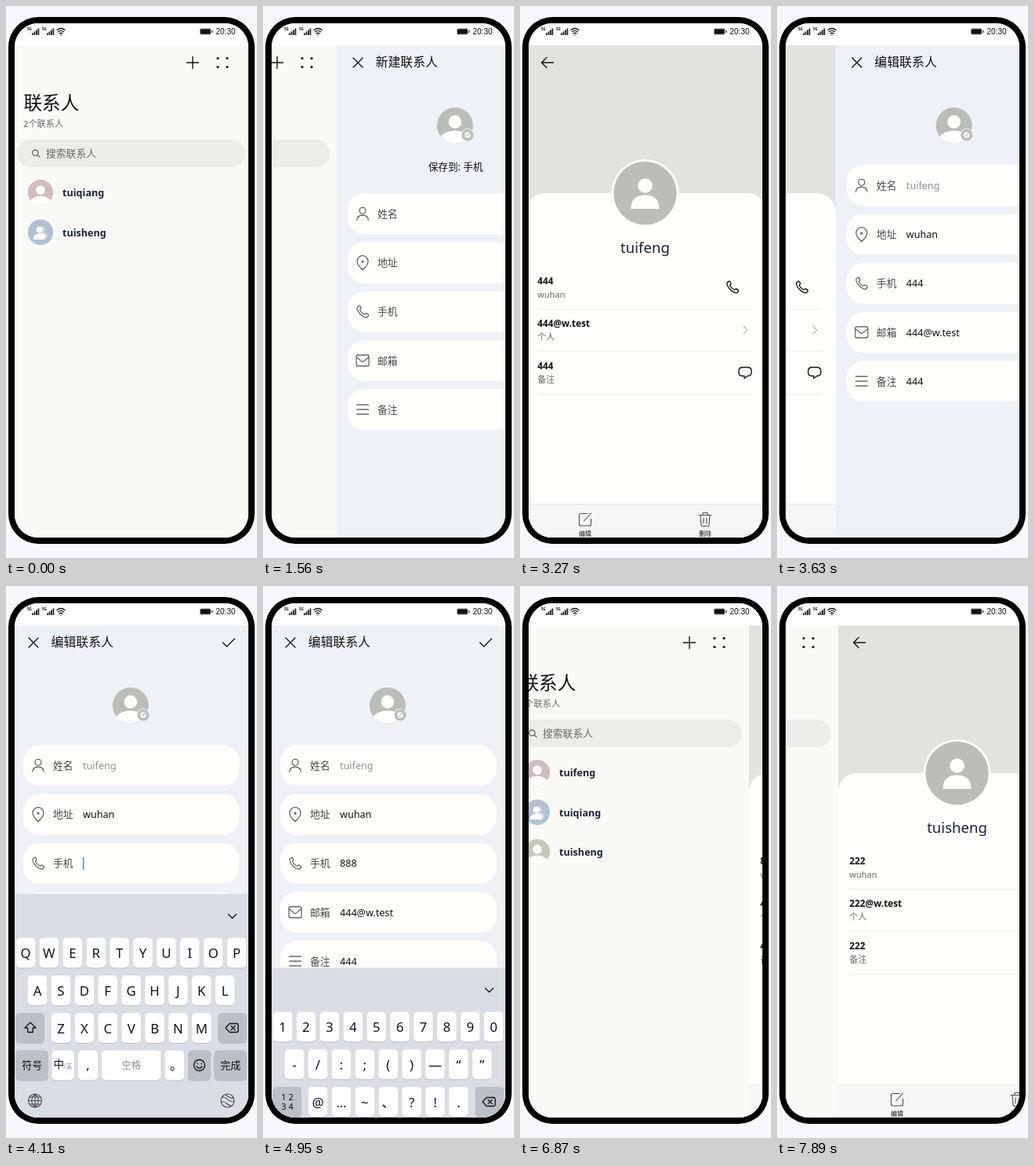
An HTML page that plays this animation: 320x702 px, repeating every 8 s.

```html
<!DOCTYPE html>
<html lang="zh-CN">
<head>
<meta charset="utf-8">
<title>联系人</title>
<style>
html, body { margin: 0; width: 100%; height: 100%; overflow: hidden; background: #f8f8fc; }
svg { display: block; width: 100%; height: 100%; }
text { font-family: "Noto Sans", "Noto Sans CJK SC", "Noto Sans CJK", sans-serif; fill: #121212; white-space: pre; }
.line { fill: none; stroke: #4c4c4c; stroke-width: 1.1; stroke-linecap: round; stroke-linejoin: round; }
.dark { stroke: #161616; stroke-width: 1.4; }
.faint { stroke: #b8b8b4; }
.mid { text-anchor: middle; }
.med { font-weight: 500; }
.bold { font-weight: 700; }
.ink { fill: #1c2038; }
.label { fill: #474747; }
.soft { fill: #696969; }
.pale { fill: #909298; }
</style>
</head>
<body>
<svg viewBox="0 0 320 702">
  <defs>
    <clipPath id="screen"><rect x="11" y="22" width="298" height="654" rx="30"/></clipPath>
  </defs>
  <rect x="3" y="14" width="314" height="670" rx="38"/>
  <g id="stage" clip-path="url(#screen)"></g>
</svg>
<script>
const LOOP = 8000, BEAT = 120, WIDTH = 306, KEYBOARD = 285;
const CUES = [0, 1200, 2130, 2460, 3270, 5850, 6510, 7650];
const SHEET = '#fefefb', GREY = '#bcbdb9', INK = '#121212';

const text = (x, y, size, s, cls = '') =>
  `<text x="${x}" y="${y + size * 0.37}" font-size="${size}" class="${cls}">${s}</text>`;
const rect = (x, y, w, h, fill, r = 0) =>
  `<rect x="${x}" y="${y}" width="${w}" height="${h}" rx="${r}" fill="${fill}"/>`;
const dot = (x, y, r, fill) => `<circle cx="${x}" cy="${y}" r="${r}" fill="${fill}"/>`;
const icon = (x, y, d, cls = '') =>
  `<path class="line ${cls}" transform="translate(${x} ${y})" d="${d}"/>`;
const page = (id, body) => `<g id="${id}" class="page">${body}</g>`;
const ring = r => `M${-r} 0a${r} ${r} 0 1 0 ${2 * r} 0a${r} ${r} 0 1 0 ${-2 * r} 0`;
const loop = (x, y, r) => `M${x - r} ${y}a${r} ${r} 0 1 0 ${2 * r} 0a${r} ${r} 0 1 0 ${-2 * r} 0`;

const ICON = {
  person: loop(0, -4, 4) + 'M-7.3 8Q-7 1.8 0 1.8T7.3 8',
  pin: 'M0 9Q-7 3-7-2A7 7 0 0 1 7-2Q7 3 0 9Z' + loop(0, -1.5, 1),
  phone: 'M-4.2-7.6L-7-5.6C-7.6 0 0 7.6 5.6 7.4L7.5 5Q7.8 3.6 4.6 2L2.4 3.4Q-2.3 1-3.4-2.4L-2-4.6Q-3.2-7.6-4.2-7.6Z',
  mail: 'M-6-7H6Q8-7 8-5V5Q8 7 6 7H-6Q-8 7-8 5V-5Q-8-7-6-7ZM-7.5-4L-1 1.2Q0 2 1 1.2L7.5-4',
  lines: 'M-7.5-6H7.5M-7.5 0H7.5M-7.5 6H7.5',
  close: 'M-6-6L6 6M6-6L-6 6',
  check: 'M-7.5 0L-2.5 5L7.5-5',
  back: 'M7.5 0H-7.5M-1-6.5L-7.5 0L-1 6.5',
  plus: 'M-7.5 0H7.5M0-7.5V7.5',
  next: 'M-2.5-5L2.5 0L-2.5 5',
  down: 'M-5-2.5L0 2.5L5-2.5',
  search: loop(-0.6, -0.7, 3.7) + 'M2.2 2L5 4.7',
  chat: 'M-4-6.5H4A4.5 4.5 0 0 1 8-2V0A4.5 4.5 0 0 1 4 4.5H3L-1 7.5V4.5H-4A4.5 4.5 0 0 1-8 0V-2A4.5 4.5 0 0 1-4-6.5Z',
  edit: 'M3-7.5H-5.5Q-7.5-7.5-7.5-5.5V6Q-7.5 8-5.5 8H5.5Q7.5 8 7.5 6V-1M7.5-8L-1.5 2',
  trash: 'M-8-5.5H8M-3-5.5V-8.5H3V-5.5M-6-5.5L-5 7Q-4.8 8.5-3.5 8.5H3.5Q4.8 8.5 5 7L6-5.5M-2-2V5M2-2V5',
  shift: 'M0-7L7 0H3.3V5.5H-3.3V0H-7Z',
  erase: 'M-3-5.5H6Q8-5.5 8-3.5V3.5Q8 5.5 6 5.5H-3L-8 0ZM-1-2.5L4 2.5M4-2.5L-1 2.5',
  smile: ring(7) + 'M-3.5 1.5Q0 6 3.5 1.5M-2.5-2.2V-1.8M2.5-2.2V-1.8',
  lock: 'M-5-1H5V7H-5ZM-3-1V-4A3 3 0 0 1 3-4V-1M0 2V4',
  globe: ring(8.5) + 'M-8.5 0H8.5M0-8.5V8.5M0-8.5Q-8.5 0 0 8.5Q8.5 0 0-8.5M-7-4.5H7M-7 4.5H7',
  swirl: ring(8.5) + 'M-7.5-4C-2-7 0 3 8 1M-8 2C-2-1 0 8 5.5 6.5M-3-8Q2-3 8-3',
  grid: 'M-4.5-4.5H-1V-1H-4.5ZM-4.5 4.5L-2.7 1.5L-1 4.5ZM3.2 1.2L5 3L3.2 4.8L1.5 3Z' + loop(3.2, -2.8, 1.8),
  maths: 'M-5-3H-1M-3-5V-1M2-3H6M-5 2L-1.5 5.5M-1.5 2L-5 5.5M2 3.5H6M4 1.5V1.6M4 5.5V5.6',
  faces: loop(-3, -3, 2.4) + loop(3, -3, 2.4) + loop(-3, 3, 2.4) + loop(3, 3, 2.4)
};

// Head and shoulders cut off by the lower edge of a disc.
const bust = (x, y, r, fill) => {
  const edge = r * 0.8, low = r * 0.6;
  return dot(x, y, r, fill) + dot(x, y - r * 0.2, r * 0.36, SHEET) +
    `<path fill="${SHEET}" d="M${x - edge} ${y + low}Q${x - edge * 0.6} ${y + r * 0.28} ${x} ${y + r * 0.28}T${x + edge} ${y + low}A${r} ${r} 0 0 1 ${x - edge} ${y + low}Z"/>`;
};
const figure = (x, y, k, fill) =>
  `<g transform="translate(${x} ${y}) scale(${k})" fill="${fill}"><circle cy="-9.5" r="9.3"/><path d="M-18 20Q-18 2.5 0 2.5T18 20Z"/></g>`;

function contactList(id, names) {
  const tints = ['#d0bdc0', '#b2c2d2', '#c4c9b8'];
  const rows = names.map((name, i) => {
    const y = 237.3 + i * 50.4;
    const avatar = i === 1
      ? dot(44, y, 16.2, tints[i]) + figure(46, y - 0.5, 0.36, '#dde5ec') + figure(42.5, y + 0.8, 0.42, SHEET)
      : bust(44, y, 16.2, tints[i]);
    return avatar + text(72, y + 0.5, 12.6, name, 'bold ink');
  }).join('');
  const menu = [270, 282].map(x => dot(x, 66.5, 1.6, INK) + dot(x, 77.5, 1.6, INK)).join('');
  return page(id, rect(8, 50, WIDTH, 630, '#f9faf6') + icon(238, 72, ICON.plus, 'dark') + menu +
    text(22.5, 123, 23.6, '联系人') + text(22, 149.5, 11.2, names.length + '个联系人', 'soft') +
    rect(14, 170, 291, 35, '#ececE8', 17.5) + icon(38, 187.5, ICON.search) +
    text(51, 187.5, 12.8, '搜索联系人', 'soft') + rows);
}

function contactForm(id, title, top, note) {
  const fields = [['姓名', 'person'], ['地址', 'pin'], ['手机', 'phone'], ['邮箱', 'mail'], ['备注', 'lines']];
  const rows = fields.map(([label, name], i) => {
    const y = top + i * 62.2;
    return rect(22, y, 275.5, 52, SHEET, 21) + icon(41, y + 26, ICON[name]) +
      text(60, y + 26, 12.8, label, 'label') + text(98, y + 26, 12.6, '', 'value');
  }).join('');
  return page(id, rect(8, 50, WIDTH, 630, '#eef1f5') + icon(35, 72, ICON.close, 'dark') +
    text(57.5, 71.5, 15.9, title, 'med') + icon(284, 72, ICON.check, 'dark') +
    bust(158.8, 152, 23, GREY) + dot(175, 164, 8.6, '#eef1f5') + dot(175, 164, 7.4, GREY) +
    rect(171.5, 160.5, 7, 7, SHEET, 1.5) + icon(175, 164, 'M-1.5 1.5L2.5-2.5', 'faint') +
    (note ? text(159.5, 204.5, 12.6, '保存到: 手机', 'mid') : '') + rows);
}

function contactCard(id, name, phone, code) {
  const entry = (y, head, sub) => text(22.3, y, 11.8, head, 'bold') + text(22.3, y + 17.3, 11, sub, 'soft med');
  const rules = [385, 438.5, 493.5].map(y => rect(22, y, 275, 1, '#eeeeeb')).join('');
  return page(id, rect(8, 50, WIDTH, 630, '#e2e3df') + icon(35, 72, ICON.back, 'dark') +
    `<path fill="${SHEET}" d="M8 680V262A24 24 0 0 1 32 238H290A24 24 0 0 1 314 262V680Z"/>` +
    dot(159.5, 238, 43, SHEET) + dot(159.5, 238, 40.2, GREY) + figure(159.5, 238, 1, SHEET) +
    text(159.5, 307, 18.6, name, 'mid ink') + rules +
    entry(349.5, phone, 'wuhan') + entry(403.5, code + '@w.test', '个人') + entry(457.5, code, '备注') +
    icon(271, 357.5, ICON.phone, 'dark') + icon(287.5, 412, ICON.next, 'faint') + icon(287, 466, ICON.chat, 'dark') +
    rect(8, 633, WIDTH, 50, '#f6f7f4') + rect(8, 633, WIDTH, 1, '#e8e8e5') +
    icon(83, 653, ICON.edit) + icon(236, 653, ICON.trash) +
    text(83, 671, 8, '编辑', 'mid') + text(236, 671, 8, '删除', 'mid'));
}

const key = (x, y, w, body, special) =>
  rect(x, y + 1, w, 38, '#b9bdc4', 5) + rect(x, y, w, 38, special ? '#bbbfc6' : '#fefefe', 5) + body;
const keyRow = (chars, x, y) => [...chars].map((c, i) => {
  const cx = x + i * 29.9;
  return key(cx - 12.3, y, 24.6, text(cx, y + 19.5, 16.8, c, 'mid'));
}).join('');
const wordKey = (x, w, s, size, cls, special) => key(x, 590.5, w, text(x + w / 2, 609.5, size, s, 'mid ' + cls), special);

const letterKeys = () => keyRow('QWERTYUIOP', 25, 447.5) + keyRow('ASDFGHJKL', 40, 495.3) + keyRow('ZXCVBNM', 70, 543) +
  key(12.5, 543, 36.5, icon(31, 562, ICON.shift, 'dark'), true) +
  wordKey(12.5, 41.5, '符号', 13, '', true) +
  key(58.5, 590.5, 28.5, text(60.5, 608.5, 13.5, '中') + text(73.5, 611, 8, '/英', 'pale')) +
  wordKey(92, 25, ',', 16, '') + wordKey(122, 75.5, '空格', 12.5, 'pale') +
  key(202.5, 590.5, 24.5, text(209, 609, 16, '。')) +
  key(232, 590.5, 29, icon(246.5, 609.5, ICON.smile, 'dark'), true) +
  wordKey(265.5, 41.5, '完成', 13, '', true);

const symbolKeys = () => keyRow('1234567890', 25, 447.5) + keyRow('-/:;()—“”', 40, 495.3) + keyRow('@…~、?!.', 70, 543) +
  key(12.5, 543, 36.5, text(31, 556, 11, '1 2', 'mid') + text(31, 568, 11, '3 4', 'mid'), true) +
  wordKey(12.5, 41.5, '返回', 13, '', true) +
  dot(75, 609.5, 10.3, '#c4c8cf') + text(75, 609.5, 8, '#+=', 'mid bold') +
  text(105.5, 609.5, 12, '中', 'mid pale') + text(136, 609.5, 12, '英', 'mid pale') +
  icon(166.5, 609, ICON.grid, 'faint') + icon(197, 609, ICON.maths, 'faint') + icon(228, 609, ICON.faces, 'faint') +
  icon(256, 609, 'M2-5H-2V5H2M-2 0H2', 'faint') +
  key(265.5, 590.5, 41.5, icon(286, 608.5, ICON.lock), true);

const keyboard = () => `<g id="keyboard">` + rect(8, 391.5, WIDTH, 290, '#dadde3') + icon(288.5, 420, ICON.down, 'dark') +
  `<g id="letters">${letterKeys()}</g><g id="symbols">${symbolKeys()}</g>` +
  key(270.5, 543, 36.5, icon(288, 562, ICON.erase, 'dark'), true) +
  icon(37, 654.5, ICON.globe) + icon(282.5, 654.5, ICON.swirl) + '</g>';

function statusBar() {
  const bars = x => [0, 1, 2, 3].map(i => rect(x + 6 + i * 2.5, 34.5 - i * 2, 1.8, 2.5 + i * 2, '#242424')).join('') +
    text(x, 29, 4.5, '5G', 'bold');
  return rect(8, 20, WIDTH, 30, '#fff') + bars(27) + bars(46) +
    icon(70, 37, 'M-5-6.5Q0-10.5 5-6.5M-3.5-4.2Q0-7 3.5-4.2M-1.8-2Q0-3.4 1.8-2M0 0V.1', 'dark') +
    rect(247, 28.5, 14.5, 8, '#888', 2) + rect(248, 29.5, 12.5, 6, INK, 1) + rect(262.2, 30.8, 1.5, 3.4, '#585858', 0.7) +
    `<text x="267.5" y="36" font-size="10" style="font-family:'Liberation Sans',Arial,sans-serif">20:30</text>`;
}

document.getElementById('stage').innerHTML = rect(8, 20, WIDTH, 660, '#f9faf6') +
  contactList('pair', ['tuiqiang', 'tuisheng']) +
  contactList('trio', ['tuifeng', 'tuiqiang', 'tuisheng']) +
  contactForm('create', '新建联系人', 238.3, true) +
  contactForm('revise', '编辑联系人', 202.3, false) +
  contactCard('saved', 'tuifeng', '444', '444') +
  contactCard('updated', 'tuifeng', '888', '444') +
  contactCard('other', 'tuisheng', '222', '222') +
  `<g id="caret">${rect(98, 345, 1.3, 16, '#4878c8')}</g>` +
  keyboard() + statusBar();

const byId = id => document.getElementById(id);
const pages = [...document.querySelectorAll('.page')];
const clamp = v => Math.min(1, Math.max(0, v));
const smooth = v => (v = clamp(v)) * v * (3 - 2 * v);
const visible = (el, on) => { el.style.display = on ? '' : 'none'; };

// cubic-bezier(.2, 0, .2, 1), solved by bisection
function glide(x) {
  if (x <= 0) return 0;
  let lo = 0, hi = 1;
  for (let i = 0; i < 24; i++) {
    const u = (lo + hi) / 2;
    if (0.6 * u * (1 - u) + u ** 3 < x) lo = u; else hi = u;
  }
  const y = smooth(lo);
  return y > 0.97 ? 1 : y;
}

function place(id, x) {
  const el = byId(id);
  visible(el, Math.abs(x) < WIDTH);
  el.setAttribute('transform', `translate(${x} 0)`);
}

function push(under, over, progress) {
  pages.forEach(p => visible(p, false));
  place(under, -WIDTH * progress);
  place(over, WIDTH * (1 - progress));
}

function fill(id, values) {
  byId(id).querySelectorAll('.value').forEach((el, i) => { el.textContent = values[i] || ''; });
}

function keyboardDrop(t) {
  if (t >= 2460 && t < 3270) return smooth((t - 2460) / 360);
  if (t >= 3750 && t < 4800) return 1 - smooth((t - 3750) / 330);
  if (t >= 4800 && t < 5850) return smooth((t - 4800) / 390);
  return 1;
}

function render(time) {
  const cue = CUES.filter(c => c <= time).pop();
  const t = cue + Math.floor((time - cue) / BEAT) * BEAT;

  if (t < 3270) push('pair', 'create', glide((t - 1313) / 600));
  else if (t < 5850) push('saved', 'revise', glide((t - 3350) / 600));
  else if (t < 7650) push('trio', 'updated', 1 - glide((t - 6470) / 600));
  else push('trio', 'other', glide((t - 7616) / 600));

  const mail = '444@w.test';
  fill('create', t < 2130 ? [] : ['tuifeng', 'wuhan', '444', mail, t < 2460 ? '' : '444']);
  const typed = '8'.repeat(Math.min(3, Math.max(0, Math.floor((t - 4230) / BEAT))));
  fill('revise', ['tuifeng', 'wuhan', t < 4110 ? '444' : typed, mail, '444']);
  byId('revise').querySelector('.value').style.fill = '#929292';

  const typedLength = t < 4110 ? 3 : typed.length;
  visible(byId('caret'), t >= 3990 && t < 4950);
  byId('caret').setAttribute('transform', `translate(${typedLength * 7.3} 0)`);

  const drop = keyboardDrop(t), symbols = t < 3270 || t >= 4230;
  visible(byId('keyboard'), drop < 1);
  byId('keyboard').setAttribute('transform', `translate(0 ${drop * KEYBOARD})`);
  visible(byId('letters'), !symbols);
  visible(byId('symbols'), symbols);
}

const start = performance.now();
function tick() {
  render((performance.now() - start) % LOOP);
  requestAnimationFrame(tick);
}
tick();
</script>
</body>
</html>
```
